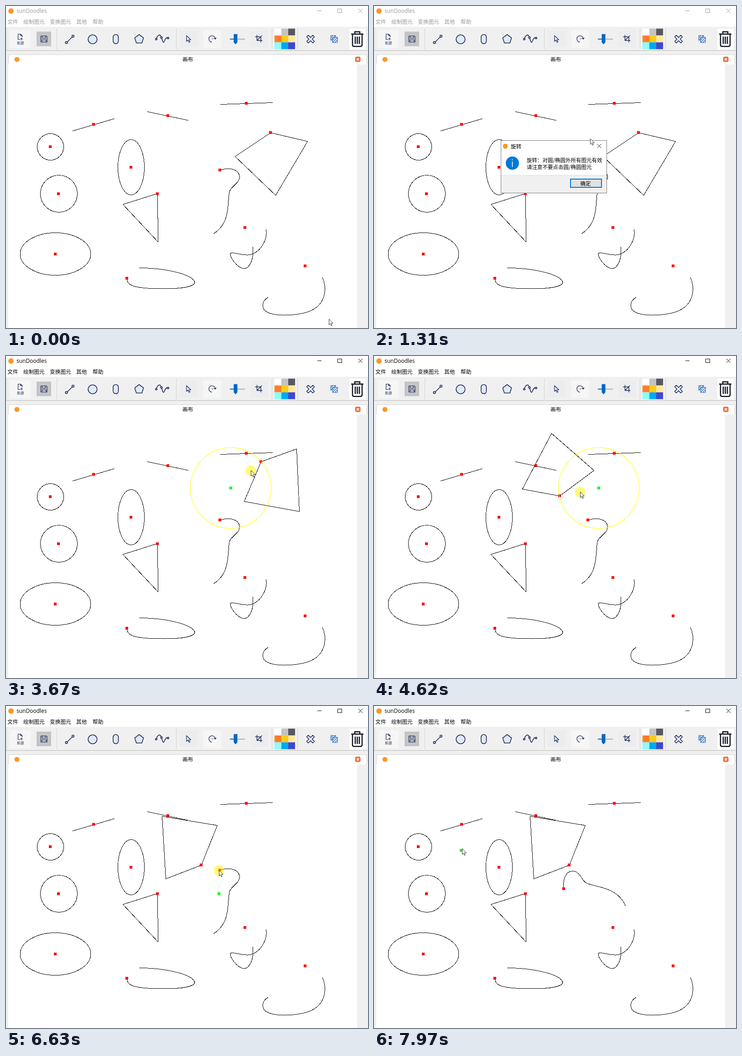
An HTML page that plays this animation: 794x705 px, repeating every 8 s.

```html
<!DOCTYPE html>
<html lang="zh-CN">
<head>
<meta charset="utf-8">
<style>
  html, body { margin: 0; width: 100%; height: 100%; overflow: hidden; background: #f0f0f0; }
  svg { display: block; width: 794px; height: 705px; font: 11.7px "Noto Sans CJK SC", "Noto Sans CJK", "Noto Sans CJK JP", sans-serif; }
  .crisp { shape-rendering: crispEdges; }
  .ink { fill: none; stroke: #000; }
  .tool { fill: #e0e9f8; stroke: #1d2759; stroke-width: 1.6; stroke-linejoin: round; stroke-linecap: round; }
  .bare { fill: none; }
  .logo { fill: #f59a2c; }
</style>
</head>
<body>
<svg viewBox="0 0 794 705">
  <rect width="794" height="45" fill="#fff"/>
  <circle class="logo" cx="11" cy="11" r="6"/>
  <g id="chrome" fill="currentColor">
    <text x="23" y="15" font-family="Open Sans, Noto Sans, sans-serif" font-size="12">sunDoodles</text>
    <text y="38.5"><tspan x="3">文件</tspan><tspan x="38">绘制图元</tspan><tspan x="96">变换图元</tspan><tspan x="154">其他</tspan><tspan x="190">帮助</tspan></text>
    <path d="M683 10.5h9M727.5 6.5h9v8h-9zM773 6l9 9m0-9l-9 9" fill="none" stroke="currentColor"/>
  </g>

  <!-- toolbar -->
  <g class="crisp">
    <rect y="45" width="794" height="53" fill="#f0f0f0"/>
    <path d="M0 45.5h794" stroke="#f8f8f8"/>
    <path d="M0 97.5h794" stroke="#b9b9b9"/>
    <path d="M1.5 49v46" stroke="#aaa" stroke-dasharray="1 2"/>
    <path d="M111.5 49v46M373.5 49v46M583.5 49v46M639.5 49v46" stroke="#d2d2d2"/>
    <path d="M8 53h46v39H8zM433 53h39v39h-39z" fill="#f6f6f6"/>
    <path d="M381 54h40v36h-40zM536 54h38v36h-38z" fill="#ebedef"/>
    <path d="M67 56h32v32H67z" fill="#c4c4c6"/>
    <path d="M753 50h36v45h-36z" fill="#fff"/>
  </g>
  <g class="tool">
    <g class="bare" stroke-width="1.2">
      <path d="M32 61.5h-5.5v12h4M32 61.5l3.5 3.5v3M32 61.5v3.5h3.5M34 69.5v5M31.5 72h5"/>
      <path d="M77 65.5h11.5l1.5 1.500v12H76.5v-13zM79.5 66v4.5h7V66M79 79v-5h9v5"/>
    </g>
    <path d="M135 78l10-10"/>
    <circle cx="132.500" cy="80" r="2.300"/><circle cx="147" cy="66" r="2.300"/>
    <circle cx="190" cy="73" r="9.800"/>
    <rect x="235" y="62.500" width="11.500" height="20" rx="5.700"/>
    <path d="M292 62.5l9.7 7.3-3.7 11.2h-12l-3.7-11.2z"/>
    <path class="bare" d="M330 72C332 64 338 59 341 69S345 83 348 76S352 69 355 70"/>
    <circle cx="329.500" cy="72.500" r="1.800"/><circle cx="341" cy="69" r="1.800"/><circle cx="355.500" cy="70" r="1.800"/>
    <path d="M396 65v12.5l3.2-2.8 2.3 5 2-1-2.3-4.7h4.300z" stroke-width="1.200"/>
    <path class="bare" stroke-width="1.300" d="M459 72a7 7 0 1 0-8 7M461 70l-2 2.500-3-2M452 72h1"/>
    <path class="bare" stroke-width="1.400" d="M550.5 64v11.5H562M547 67.5h12V79M551 75l10-10"/>
    <path d="M663 64l5 5 5-5 3.5 3.5-5 5 5 5-3.5 3.5-5-5-5 5-3.5-3.5 5-5-5-5z" stroke-width="1.500"/>
  </g>
  <text x="24" y="84" font-size="7.700" fill="#33365e">新建</text>
  <path d="M491 72.5h11" stroke="#0067c0" stroke-width="2"/>
  <path d="M507 72.5h17" stroke="#a9abad" stroke-width="2"/>
  <path d="M499.5 61.5h8v18l-4 4.5-4-4.500z" fill="#0067c0"/>
  <g id="swatches"></g>
  <g fill="none" stroke="#2d6fb8" stroke-width="1.200">
    <path d="M716 75h-3.500V64.5H723V68M713 69l4-4M713 74l9-9"/>
    <path d="M716.5 68.5H727V80h-10.500zM717 74l5-5M717 79l10-10M721 80l6-6"/>
  </g>
  <path d="M757 61.5h27M765 61v-4.500h11V61M760 62v23q0 3.500 3.500 3.500h14q3.500 0 3.500-3.500V62M766 67v16M770.5 67v16M775 67v16" fill="none" stroke="#111522" stroke-width="2.500"/>

  <!-- document window -->
  <g class="crisp">
    <path d="M5 106h786v22H5z" fill="#fff"/>
    <path d="M5 106.5h786.5V128M5.5 106v22" fill="none" stroke="#d4d4d4"/>
    <path d="M5 128h765v577H5z" fill="#fff"/>
  </g>
  <circle class="logo" cx="24" cy="117" r="5.500"/>
  <text x="387" y="121">画布</text>
  <rect x="766.500" y="111.500" width="10.500" height="10.500" rx="2" fill="#f47a42" stroke="#d9542b"/>
  <path d="M769.5 114.5l4.5 4.5m0-4.5l-4.5 4.5" stroke="#fff" stroke-width="1.600"/>

  <g id="drawing" class="crisp"></g>
  <circle id="guide" class="crisp" fill="none" stroke="#ff0"/>
  <rect id="pivot" class="crisp" width="6" height="6" fill="#0f0"/>

  <g id="dialog">
    <g class="crisp">
      <path d="M278.5 294.5h232v114.5h-232z" fill="#fff" stroke="#777"/>
      <path d="M279 371h231v38H279z" fill="#f0f0f0"/>
      <path d="M279 370.5h231" stroke="#dfdfdf"/>
      <path d="M431 379h68v18h-68z" fill="#e1e1e1" stroke="#0078d7" stroke-width="2"/>
    </g>
    <circle class="logo" cx="288" cy="307" r="5.500"/>
    <text x="300" y="311.500">旋转</text>
    <path d="M489.5 302l9 9m0-9l-9 9" stroke="#222"/>
    <circle cx="303.500" cy="344" r="14.500" fill="#0078d7"/>
    <path d="M303.5 340.5v12M303.5 335.5v2.200" stroke="#fff" stroke-width="1.700"/>
    <g font-size="11.500">
      <text x="335" y="341.500">旋转：对圆/椭圆外所有图元有效</text>
      <text x="335" y="356.500">请注意不要点击圆/椭圆图元</text>
      <text x="452.500" y="393">确定</text>
    </g>
  </g>

  <g id="cursor">
    <circle id="press" cy="1" r="11.500" fill="#fff500" opacity=".52"/>
    <path d="M.5 .5V13L3.300 10.300 5.300 15 7.300 14.200 5.300 9.600H9.300z" fill="#fff" stroke="#222" stroke-width=".9"/>
  </g>
</svg>
<script>
const $ = id => document.getElementById(id);
const show = (el, on) => el.style.display = on ? '' : 'none';
const move = (el, x, y) => el.setAttribute('transform', `translate(${Math.round(x)} ${Math.round(y)})`);
const clamp = u => Math.min(1, Math.max(0, u));
const smooth = u => u * u * (3 - 2 * u);

$('swatches').innerHTML = '#fff #c3c3c3 #585862 #ff7f27 #ffca18 #fde9a0 #8cfffb #00a8f3 #3f48cc'.split(' ')
  .map((c, i) => `<rect x="${589 + i % 3 * 15}" y="${49.5 + Math.floor(i / 3) * 15}" width="15" height="15" fill="${c}"/>`).join('');

// Every figure is an outline with a red handle.
function figure(outline, x, y) {
  $('drawing').insertAdjacentHTML('beforeend', `<g><g class="ink" transform="translate(.5 .5)">${outline}</g>
    <rect x="-3" y="-3" width="6" height="6" fill="#f00" transform="translate(${x} ${y})"/></g>`);
  return $('drawing').lastChild;
}
const pen = (d, x, y) => figure(`<path d="${d}"/>`, x, y);
const line = (x1, y1, x2, y2) => pen(`M${x1} ${y1}L${x2} ${y2}`, Math.floor((x1 + x2) / 2), Math.round((y1 + y2) / 2 - .5));
const oval = (x, y, rx, ry) => figure(`<ellipse cx="${x}" cy="${y}" rx="${rx}" ry="${ry}"/>`, Math.floor(x), Math.floor(y + .5));

line(146, 273, 238, 246);
line(310, 231, 400, 250);
line(470, 215, 585, 211);
oval(97, 308, 29, 29);
oval(115.5, 410.5, 40.5, 40.5);
oval(274, 352.5, 29, 60.5);
oval(108, 542.5, 77.5, 46.5);
pen('M332 410L333 516 256 434z', 332, 411);
pen('M541 526V541C541 556 533 574 522 574.500C508 574 488 548 492 541C496 537 515 545.500 531 544.500C556 542 574 512 570 489', 524, 485);
pen('M574.500 637.500C562 644 560 657 566.500 665.500C575 674 594 676.500 608 676.500C640 676 662 671 674 663.500C700 649 704 617 693.500 593.500', 656, 569);
pen('M265 596C265 610 275 618.500 345 618.500C390 618.500 413.500 613 413.500 604C408 587 350 573 291.500 573', 265, 596);

// Shapes turned by dragging: the pivot is visible from..to; each turn is [start, end, degrees].
const spins = [
  { x: 493, y: 289, from: 2880, to: 5130, radius: 88.5, near: 42, grip: -8,
    path: 'M580 277L661 296 591 414 502 329z',
    turns: [[3520, 4070, -121], [4290, 4590, -62], [4750, 5090, -31.4]] },
  { x: 467, y: 411, from: 5470, to: 7080, radius: 51, near: 44, grip: -90,
    path: 'M469 359C486 353 506 355 511 369C516 386 494 393 490 405C484 428 494 473 455 498',
    turns: [[6700, 7060, -80.4]] },
  { x: 191, y: 316, from: 7740, to: 8000, turns: [] }
];
for (const s of spins) if (s.path) s.el = pen(s.path, 0, 0);

const presses = [[760, 830], [1790, 1880], [2880, 2960], [3520, 5130], [5470, 5620], [6630, 7080], [7740, 7830]];

// Cursor stops: [arrival, x, y]; the way to each takes at most LEG.
const LOOP = 8000, LEG = 450;
const stops = [
  [0, 708, 685], [520, 452, 70], [1310, 474, 290], [1790, 465, 388], [2330, 491, 337], [2850, 493, 289], [3270, 581, 275],
  [5130, 462, 318], [5470, 466, 410], [5930, 500, 428], [6440, 467, 359],
  [7080, 423, 403], [7430, 199, 390], [7600, 154, 340], [7740, 191, 316], [7960, 193, 312]
];

function travel(t) {
  let [then, x, y] = stops[0];
  for (const [at, nx, ny] of stops.slice(1)) {
    const begin = Math.max(then, at - LEG), u = smooth(clamp((t - begin) / (at - begin)));
    x += (nx - x) * u;
    y += (ny - y) * u;
    then = at;
  }
  return [x, y];
}

function turnShape(s, deg) {
  const c = Math.cos(deg * Math.PI / 180), n = Math.sin(deg * Math.PI / 180);
  const d = s.path.replace(/(\d+) (\d+)/g, (_, px, py) => {
    const dx = px - s.x, dy = py - s.y;
    return `${Math.round(s.x + dx * c - dy * n)} ${Math.round(s.y + dx * n + dy * c)}`;
  });
  s.el.querySelector('path').setAttribute('d', d);
  move(s.el.querySelector('rect'), ...d.match(/\d+/g));
}

function draw(t) {
  const within = ([from, to]) => t >= from && t < to;
  const modal = within([1000, 1880]);
  $('chrome').style.color = t < 760 || modal ? '#999' : '#000';
  show($('dialog'), modal);

  let [x, y] = travel(t), ring = null;
  for (const s of spins) {
    if (!s.path) continue;
    const deg = s.turns.reduce((sum, [a, b, by]) => sum + by * clamp((t - a) / (b - a)), 0);
    turnShape(s, deg);
    if (!deg || t >= s.to) continue;
    ring = s;
    // The hand drifts inwards while it circles the pivot.
    const angle = (deg + s.grip) * Math.PI / 180, r = s.near + (s.radius - s.near) * Math.exp(deg / 33);
    x = s.x + r * Math.cos(angle);
    y = s.y + r * Math.sin(angle);
  }
  show($('guide'), ring);
  if (ring) {
    $('guide').setAttribute('r', ring.radius);
    move($('guide'), ring.x, ring.y);
  }

  const dot = spins.find(s => within([s.from, s.to]));
  show($('pivot'), dot);
  if (dot) move($('pivot'), dot.x - 3, dot.y - 3);

  show($('press'), presses.some(within));
  move($('cursor'), x, y);
}

const start = performance.now();
function loop() {
  draw((performance.now() - start) % LOOP);
  requestAnimationFrame(loop);
}
loop();
</script>
</body>
</html>
```
